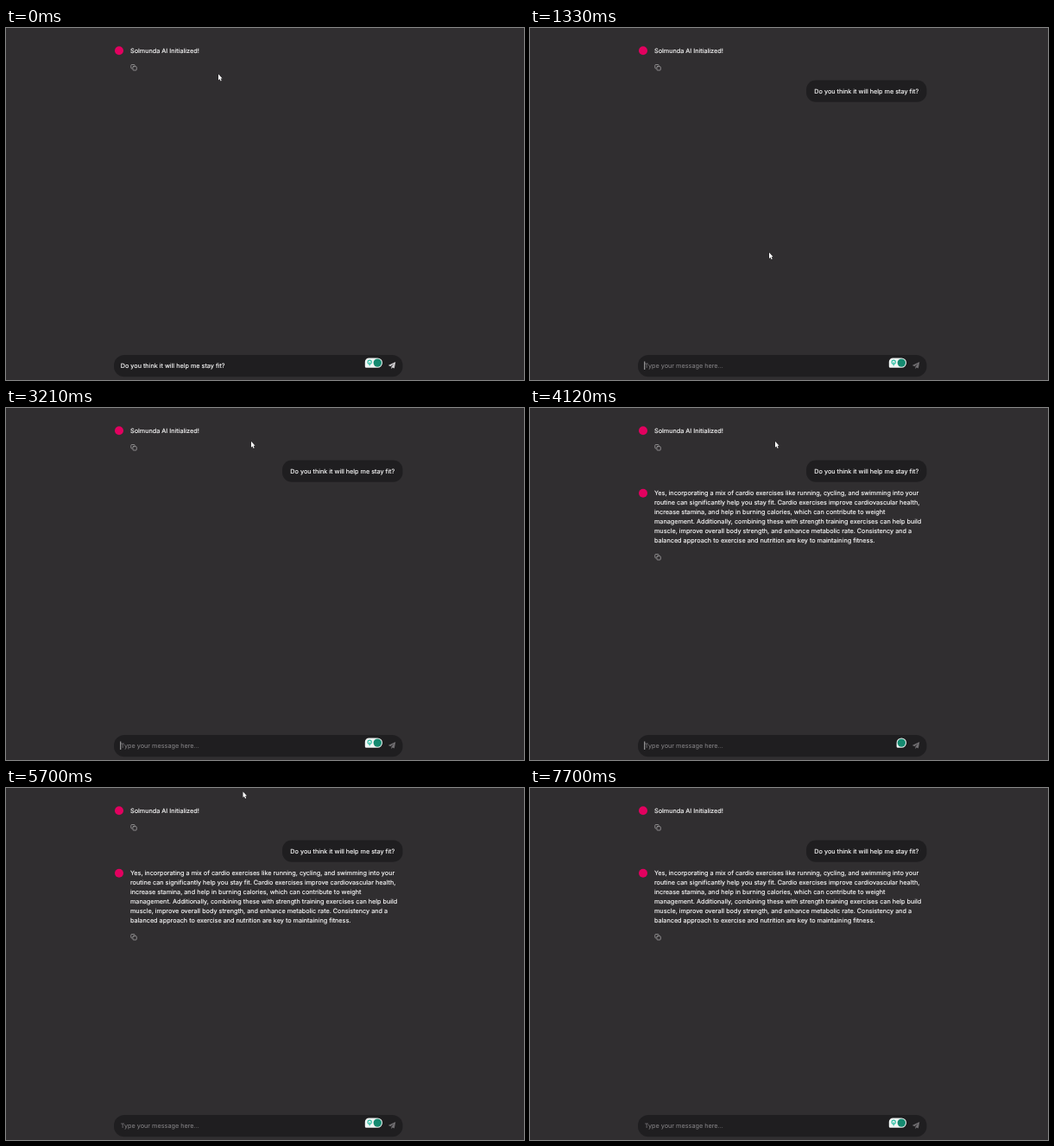
Write an HTML page that moves like this. It is 600 px wide and 408 px high and loops after 7.73 s.

```html
<!DOCTYPE html>
<html lang="en">
<head>
<meta charset="utf-8">
<title>Chat assistant</title>
<style>
  html, body { margin: 0; width: 100%; height: 100%; overflow: hidden; background: #302e30; }
  svg { display: block; width: 600px; height: 408px; }
  text {
    font: 400 7.27px Inter, "Liberation Sans", sans-serif;
    fill: #fff; stroke: #fff; stroke-width: .14; text-rendering: geometricPrecision;
  }
  .panel { fill: #1f1e20; }
  .logo { fill: #e2005f; }
  .hint { fill: #8a888b; stroke: none; }
  .copy { fill: none; stroke: #b2b0b2; stroke-width: .7; stroke-linecap: round; stroke-linejoin: round; }
</style>
</head>
<body>
<svg viewBox="0 0 600 408" xmlns="http://www.w3.org/2000/svg">
  <defs>
    <g id="copy" class="copy">
      <rect x="2.3" y="2.3" width="4.4" height="4.4" rx=".9"/>
      <path d="M1.2 4.6H1A.8.8 0 0 1 .2 3.8V1A.8.8 0 0 1 1 .2H3.8A.8.8 0 0 1 4.6 1V1.2"/>
    </g>
  </defs>
  <rect width="600" height="408" fill="#302e30"/>

  <circle class="logo" cx="131" cy="26.3" r="5"/>
  <text x="144" y="28.6">Solmunda AI Initialized!</text>
  <use href="#copy" x="144.6" y="42.3"/>

  <g id="question">
    <rect class="panel" x="320" y="60.5" width="139.5" height="25.2" rx="11"/>
    <text x="329.3" y="75.6">Do you think it will help me stay fit?</text>
  </g>

  <g id="answer">
    <circle class="logo" cx="131" cy="98.8" r="5"/>
    <g id="lines"></g>
    <use href="#copy" x="144.6" y="169.3"/>
  </g>

  <rect class="panel" x="125" y="379" width="334.5" height="25.3" rx="12"/>
  <text id="draft" x="132.7" y="394.1">Do you think it will help me stay fit?</text>
  <text id="hint" class="hint" x="132.7" y="394.1">Type your message here...</text>
  <rect id="caret" x="132.4" y="386.5" width=".8" height="9.5" fill="#d8d7d8"/>

  <path id="badge" fill="#f0f6f4"/>
  <g id="bulb" fill="none" stroke="#2fbfa4" stroke-width="1.1">
    <circle cx="421.2" cy="387.3" r="2.2"/>
    <path d="M421.2 387.2V391.6"/>
  </g>
  <circle cx="430.3" cy="388.1" r="4.7" fill="#158a70"/>

  <path id="send" d="M451.2 387L442.8 391.1L445.4 392.3L449.3 389L446.4 392.8V395.2L447.8 393.5L449.8 394.4Z"/>
  <path id="pointer" d="M0 0V6.9L1.5 5.5L2.6 8L3.7 7.5L2.6 5H4.6Z" fill="#fff" stroke="#161516" stroke-width=".5" paint-order="stroke"/>
</svg>
<script>
  const LOOP = 7730, SENT = 300, REPLIED = 4120;
  const $ = id => document.getElementById(id);

  const reply = [
    "Yes, incorporating a mix of cardio exercises like running, cycling, and swimming into your",
    "routine can significantly help you stay fit. Cardio exercises improve cardiovascular health,",
    "increase stamina, and help in burning calories, which can contribute to weight",
    "management. Additionally, combining these with strength training exercises can help build",
    "muscle, improve overall body strength, and enhance metabolic rate. Consistency and a",
    "balanced approach to exercise and nutrition are key to maintaining fitness."
  ];
  $("lines").innerHTML = reply.map((line, i) =>
    `<text x="144" y="${(101.1 + i * 10.9).toFixed(1)}">${line}</text>`).join("");

  // Pointer stops: time, x, y
  const path = [
    [0, 246, 53.5], [30, 246, 53.5], [1330, 277, 260.3], [2549, 277, 260.3],
    [2550, 287, 103.5], [2729, 287, 103.5], [2730, 287.3, 101.5], [2880, 287.3, 101.5],
    [3210, 284, 38.8], [4120, 284, 38.8], [4850, 280.8, 20.7], [5700, 274.5, 4.2], [6120, 271, -12]
  ];
  // The caret starts hidden and flips at each of these times
  const flips = [700, 1910, 1940, 2550, 3150, 4300, 4900, 5500, 6100, 6700, 7300, 7700];

  const clamp = v => Math.max(0, Math.min(1, v));
  const ease = v => v * v * (3 - 2 * v);
  const show = (id, on) => $(id).setAttribute("visibility", on ? "visible" : "hidden");

  function pointerAt(t) {
    const i = path.findIndex(p => p[0] > t);
    if (i < 0) return path[path.length - 1].slice(1);
    const [t0, x0, y0] = path[i - 1], [t1, x1, y1] = path[i];
    const k = (t - t0) / (t1 - t0), e = t0 < 3000 ? ease(k) : k;
    return [x0 + (x1 - x0) * e, y0 + (y1 - y0) * e];
  }

  // 1 = wide badge with bulb, 0 = single circle
  function badgeWidth(t) {
    if (t < SENT) return 1;
    if (t < REPLIED) return ease(clamp((t - 1000) / 200));
    return ease(clamp((t - 5300) / 200));
  }

  function draw(t) {
    const sent = t >= SENT;
    show("draft", !sent);
    show("hint", sent);
    show("question", sent);
    show("answer", t >= REPLIED);
    show("caret", flips.filter(f => f <= t).length % 2);
    $("send").setAttribute("fill", sent ? "#706e71" : "#cfcdd0");

    const wide = badgeWidth(t), left = 424.6 - 8.8 * wide, r = 5.7 - wide;
    $("badge").setAttribute("d",
      `M${left + r} 382.4H430.3a5.7 5.7 0 0 1 0 11.4H${left + 1.5}` +
      `a1.5 1.5 0 0 1 -1.5 -1.5V${382.4 + r}a${r} ${r} 0 0 1 ${r} ${-r}Z`);
    $("bulb").setAttribute("opacity", clamp(wide * 2 - 1));

    $("pointer").setAttribute("transform", `translate(${pointerAt(t)})`);
  }

  const start = performance.now();
  function tick() {
    draw((performance.now() - start) % LOOP);
    requestAnimationFrame(tick);
  }
  tick();
</script>
</body>
</html>
```
